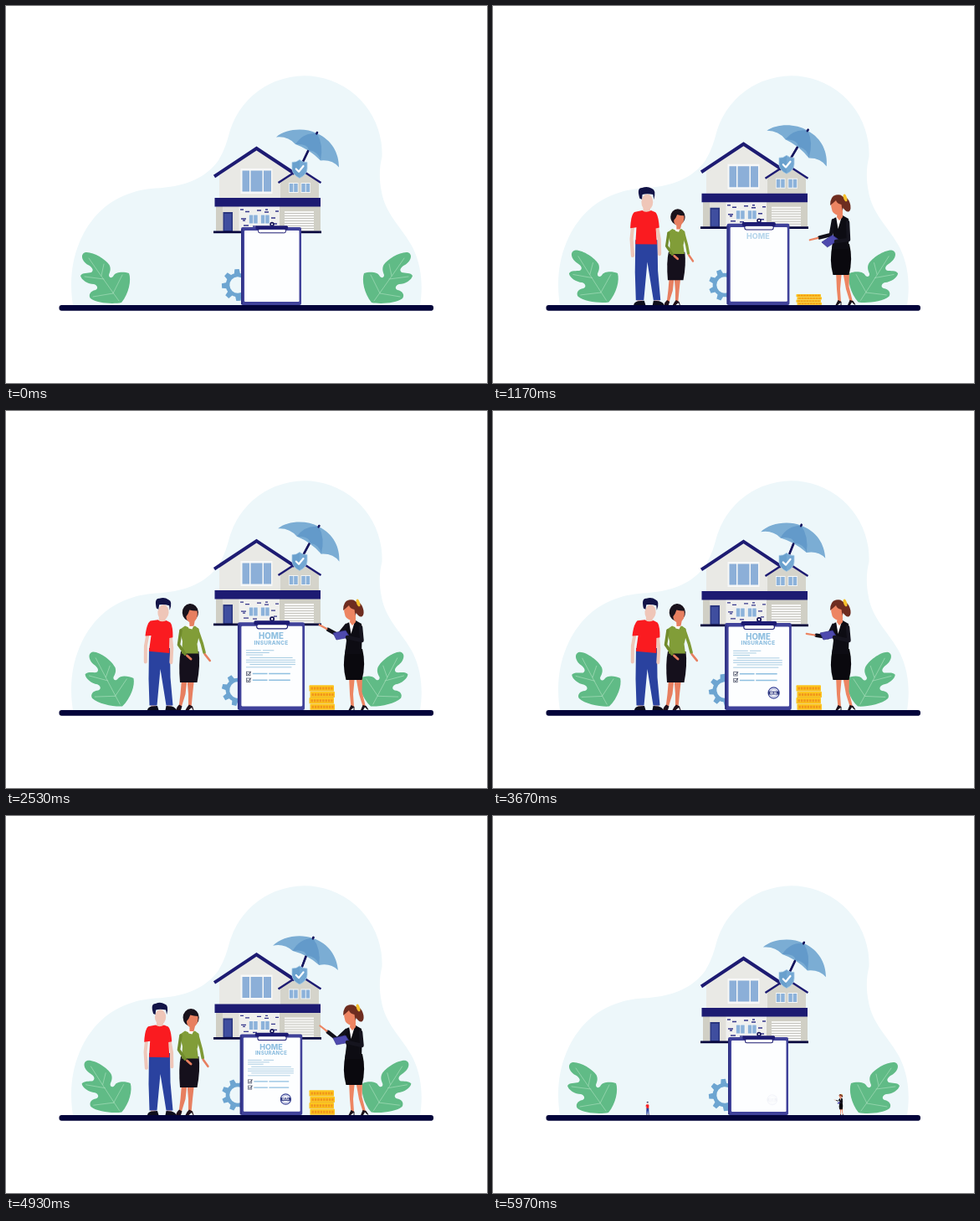
Recreate the animation shown at these times as an HTML page. Size 575 px wide and 450 px high, loop 6.01 s.

```html
<!DOCTYPE html>
<html lang="en">
<head>
<meta charset="utf-8">
<title>Home insurance</title>
<style>
html, body { margin: 0; width: 100%; height: 100%; overflow: hidden; background: #fff; }
svg { display: block; width: 575px; height: 450px; }
text { font-family: Inter, Lato, sans-serif; font-weight: 800; text-anchor: middle; fill: #8fbfe0; }
.line { fill: none; stroke-linecap: round; stroke-linejoin: round; }
</style>
</head>
<body>
<svg viewBox="0 0 575 450">
  <defs>
    <g id="leaf">
      <path fill="#60bb86" d="M95 294C104 293 119 302 123.500 309C126 314 124 318 123 321C123 325 127 325 128.500 322C131 317 141 317 147 319C150 327 147 343 138 354C128 356 109 355 101 349C98 345 101 340 107 339C111 337 109 333 105 332C98 332 90 327 89 322C91 318 98 319 102 318C106 315 102 311 98 309C91 305 88 296 95 294Z"/>
      <path class="line" stroke="#a5dcb9" stroke-width=".7" d="M99 301Q112 320 135 352M94 323L117 326M104 347L128 343M139 321L128 343M117 308L114 322"/>
    </g>
    <g id="pane"><path fill="#f5f7f7" d="M0 0h11.500v12h-11.500z"/><path fill="#8cb2da" d="M.8 1h4.500v10h-4.500zM6.200 1h4.500v10h-4.500z"/></g>
  </defs>

  <path fill="#edf7fa" d="M80 357C76 332 77 301 93 271C111 238 141 220 179 217.500C211 216 236 207 252 187C261 174 264 162 268 148A93 93 0 0 1 449.500 180C446 194 446 207 449 222C454 250 475 266 487 290C496 309 499 332 495 357Z"/>

  <g id="leafL"><use href="#leaf"/></g>
  <g transform="matrix(-1 0 0 1 575 0)"><g id="leafR"><use href="#leaf"/></g></g>

  <g id="gear"></g>

  <g id="house">
    <path fill="#e9e9e5" d="M255 201L299.500 171L345 201V230H255Z"/>
    <path fill="#d5d4cb" d="M328 209L351 194L374 209V230H328Z"/>
    <path class="line" style="stroke-linecap:butt;stroke-linejoin:miter" stroke="#1d1b72" stroke-width="4" d="M249 203.500L299.500 170L345 200"/>
    <path class="line" style="stroke-linecap:butt" stroke="#1d1b72" stroke-width="2.400" d="M325.500 211L351 194.500L376.500 211"/>
    <path fill="#f7f8f8" d="M280.500 194h38v30h-38z"/>
    <path fill="#8cafd8" d="M282.500 196.500h8.500v25h-8.500zM292.500 196.500h14v25h-14zM308 196.500h9v25h-9z"/>
    <use href="#pane" x="338" y="211"/><use href="#pane" x="352.500" y="211"/>
    <path fill="#e1e0da" d="M251 239h125v30h-125z"/>
    <path fill="#d0cfc5" d="M251 239h8v30h-8zM327 239h49v30h-49z"/>
    <path fill="#f0f0ee" d="M278.500 239h48.500v30h-48.500z"/>
    <path fill="#1d1b72" d="M249.500 229h126.500v10.500h-126.500z"/>
    <path fill="#29357f" d="M259.500 246h11.500v23h-11.500z"/>
    <path fill="#3f4e9f" d="M261 248h8.500v20h-8.500z"/>
    <path fill="#f7f7f5" d="M333 245h35v23h-35z"/>
    <path stroke="#bebdb7" stroke-width=".9" d="M333 247.500h35M333 250.500h35M333 253.500h35M333 256.500h35M333 259.500h35M333 262.500h35M333 265.500h35"/>
    <path stroke="#37388c" stroke-width="1.300" d="M280 243h4M286 245.500h5M300 244h5M310 243h3M322 245h4M281 254h6M283 256h3M284 262h6M317 253h5M320 260h4M309 246h5M295 263h5"/>
    <use href="#pane" x="290" y="248.500"/><use href="#pane" x="304" y="248.500"/>
    <path fill="#08083f" d="M248 268.500h129v2.800h-129z"/>
    <g id="umbrella">
      <path class="line" stroke="#17165e" stroke-width="2.400" d="M372 151L353 190"/>
      <path fill="#7badd4" d="M323 156.500C334 147 356 144.500 371.500 152C390 160 398 176 398 192.500Q390 183 376 184.500Q363 171 346 165Q337 155 323 156.500Z"/>
      <path fill="#639aca" d="M371.500 152Q355 151 346 165Q361 164 362 172Q374 174 376 184.500Q380 165 371.500 152Z"/>
      <path class="line" stroke="#17165e" stroke-width="2.400" d="M361 173L353 190M372 151L371.300 152.500"/>
    </g>
    <path fill="#74a8d3" stroke="#a4c9e5" stroke-width=".8" d="M351 183.500Q355 187 360 186.500V194Q360 201 351 205.500Q342 201 342 194V186.500Q347 187 351 183.500Z"/>
    <path fill="#5e97c8" opacity=".5" d="M351 184V205Q342.500 201 342.500 194V187Q347 187 351 184Z"/>
    <path class="line" stroke="#fff" stroke-width="2.200" d="M346.800 194.500L350 197.700L355.500 191"/>
  </g>

  <g id="board">
    <rect x="281" y="264" width="72" height="93" rx="2" fill="#40429a"/>
    <path fill="#2e3084" d="M281 266h2v90h-2z"/>
    <rect x="285" y="268" width="65.500" height="85" rx="1" fill="#fdfeff"/>
    <rect x="301.500" y="266" width="33" height="4.800" rx="2" fill="#fff" stroke="#1d1b72" stroke-width="1"/>
    <circle cx="318" cy="260.500" r="1.900" fill="#fff" stroke="#151457" stroke-width="1.600"/>
    <rect x="298.500" y="262.300" width="38.500" height="4.400" rx="1.500" fill="#1d1b72"/>
    <text id="home" x="317" y="281.800" font-size="8.700">HOME</text>
    <text id="insure" x="317" y="287.500" font-size="5.800" letter-spacing=".25">INSURANCE</text>
    <path id="lines" stroke="#9dc6df" stroke-width=".8" d="M290 293.800h16M308 293.800h12M290 296.200h25M290 298.500h18M294 301.500h46M290 304h53M290 306.300h53M294 308.700h49M290 311.600h49"/>
    <g id="checks"></g>
    <g id="stamp">
      <circle cx="333.800" cy="338.700" r="5.900" fill="#fff" stroke="#3b4597" stroke-width="1.100"/>
      <circle cx="333.800" cy="338.700" r="4.200" fill="none" stroke="#7d87c2" stroke-width=".7"/>
      <path fill="#2d367f" d="M327.900 336.900h11.800v3.600h-11.800z"/>
      <text x="333.800" y="339.900" font-size="3.200" style="fill:#fff">SEAL</text>
    </g>
  </g>

  <g id="coins"></g>

  <g id="man">
    <path fill="#efc6b8" d="M173 349h6v5h-6zM192.500 349h5.500v5h-5.500z"/>
    <path fill="#0d0d1b" d="M169 357Q169.500 353.500 174 352.500L181 352L182.500 357ZM190.500 357L191.500 352L198 352.500Q203 354 203.500 357Z"/>
    <path fill="#2a429f" d="M171 283H196L196.500 318L199.500 351.500H191.500L184.500 308L180.500 351.500H171.500L170.500 320Z"/>
    <g id="manTop">
      <path class="line" stroke="#efc6b8" stroke-width="4" d="M168 266L166.500 282L168 301M195 266L198 282L198.500 299"/>
      <path fill="#efc6b8" d="M179.500 244h8v8h-8z"/>
      <path fill="#fa1b20" d="M178.500 249.500Q183 253 188.500 249.500L193.500 251.500Q197 255 198 269L194 270L195.500 288H171L172 269L165 270Q165.500 255 169.500 251.500Z"/>
      <ellipse cx="184" cy="240" rx="6.600" ry="9" fill="#efc6b8"/>
      <path fill="#121347" d="M175.500 236Q171.500 224 178 224Q184 221.500 189 224.500Q194.500 226 191.500 237L190.500 231.500Q184 230 178.500 231.500L178 237Z"/>
    </g>
  </g>

  <g id="wife">
    <path fill="#e77f60" d="M210 320H216.500L214.500 338L209.500 354H206.500L208.500 338ZM216.500 320H225L223 338L221.500 354H218L218 338Z"/>
    <path fill="#201019" d="M203 357Q204 353 207 350.500L210.500 352.500L209 357H207.500ZM214.500 357Q217 352 219 350.500L223 352.500L224.500 357H223.500L222 354L218.500 357Z"/>
    <path fill="#15101c" d="M209 287H230.500Q232.500 303 228.500 324H208Q206 300 209 287Z"/>
    <g id="wifeArm">
      <path class="line" stroke="#7f9a35" stroke-width="3.600" d="M228.500 261L233 278L235 289"/>
      <path class="line" stroke="#e77f60" stroke-width="2.600" d="M235.500 291L241 299"/>
    </g>
    <path fill="#819d38" d="M214 256.500Q220 260 226 256.500L230.500 260Q231 270 228.500 278L230 289.500H210L211 275L207.500 261Z"/>
    <path class="line" stroke="#718b2c" stroke-width="3.600" d="M209 262L206.500 279L214 290"/>
    <path class="line" stroke="#e77f60" stroke-width="3" d="M216.500 292L221 296"/>
    <path fill="#fff" d="M216 254.500h9l-2.500 6l-4-1z"/>
    <g id="wifeHead">
      <ellipse cx="221.300" cy="240.500" rx="9.600" ry="10.500" fill="#19121c"/>
      <path fill="#e77f60" d="M216 245Q219 242 220.500 237.500Q225 239 229.500 239Q230.500 247 226 251L224.500 257H219.500V252Q216 250 216 245Z"/>
    </g>
  </g>

  <g id="agent">
    <path fill="#ed8562" d="M410 316H417L415 338L416 354H412.500L411 338ZM418 316H426L425.500 335L430 353L427 354L422 338Z"/>
    <path fill="#1a1019" d="M409.500 357L412.500 351L416.500 353V357H415.500V354L412 357ZM424 357L426.500 351L430.500 352L433.500 356.500H432L429 353.500L427 357Z"/>
    <path fill="#0a090e" d="M406 284H426Q430.500 302 425.500 321H406.500Q401.500 303 406 284Z"/>
    <path fill="#0d0c13" d="M408 253L418 250L425 254L425.500 272L425 290H405L407 274L404 262Z"/>
    <path fill="#fff" d="M410 251L417 251L412.500 266Z"/>
    <path id="sleeve" class="line" stroke="#111019" stroke-width="4.600"/>
    <path id="hand" class="line" stroke="#ed8562" stroke-width="2.200"/>
    <g id="tablet"><path fill="#4e4aae" stroke="#35338b" stroke-width=".7" d="M391 265L406 262L411 270L395 273Z"/></g>
    <path id="hold" class="line" stroke="#15141e" stroke-width="4.500"/>
    <path fill="#ed8562" d="M412 243h6v9l-4 4l-3-4z"/>
    <ellipse cx="422" cy="236.500" rx="4.800" ry="9.500" transform="rotate(-20 422 236.500)" fill="#6e2d20"/>
    <path fill="#ed8562" d="M404 235Q410 226 418 232L417 244Q414 250 410 249Q404 247 404 235Z"/>
    <path fill="#6e2d20" d="M403 238Q403 227 410 225.500Q418 224 420 231Q420 240 417.500 244L416.500 237Q411 236 410 232Q407 235 403 238Z"/>
    <ellipse cx="421" cy="229" rx="2" ry="4.600" transform="rotate(-18 421 229)" fill="#f5c02c"/>
  </g>

  <rect x="63.500" y="357" width="447.500" height="6.800" rx="3" fill="#03043a"/>
</svg>
<script>
const LOOP = 6010;
const $ = id => document.getElementById(id);
const clamp = u => Math.max(0, Math.min(1, u));
const span = (t, start, dur) => clamp((t - start) / dur);
const move = (id, value) => $(id).setAttribute('transform', value);
const path = (id, d) => $(id).setAttribute('d', d);
const backOut = u => 1 + 2.2 * (u - 1) ** 3 + 1.2 * (u - 1) ** 2;
const mix = (a, b, u) => a + (b - a) * u;

// Smoothed interpolation through [time, value] stops
function keyed(stops, t) {
  for (let i = 1; i < stops.length; i++) {
    const [t0, a] = stops[i - 1], [t1, b] = stops[i];
    if (t <= t1) {
      const u = span(t, t0, t1 - t0);
      return mix(a, b, u * u * (3 - 2 * u));
    }
  }
  return stops[stops.length - 1][1];
}

const grow = (t, inAt, inDur, outAt, outDur) =>
  t < inAt ? 0 : backOut(span(t, inAt, inDur)) * (1 - span(t, outAt, outDur) ** 3);

function scaleAt(id, x, y, sx, sy = sx) {
  $(id).style.display = sx > .005 && sy > .005 ? '' : 'none';
  move(id, `translate(${x} ${y}) scale(${sx} ${sy}) translate(${-x} ${-y})`);
}

function fade(id, t, start, dur, out = 5550) {
  $(id).setAttribute('opacity', span(t, start, dur) * (1 - span(t, out, 400)));
}

let cog = '<circle r="12" fill="none" stroke="#6da5d1" stroke-width="4.600"/>';
for (let a = 0; a < 360; a += 45)
  cog += `<path fill="#6da5d1" transform="rotate(${a})" d="M-3.600 -13L-2.700 -19H2.700L3.600 -13Z"/>`;
$('gear').innerHTML = cog;

let stack = '';
for (let i = 0; i < 4; i++) {
  const x = 362.5 + (i % 2), y = 327.3 + i * 7.4;
  stack += `<rect x="${x}" y="${y}" width="29.500" height="7" rx="1" fill="#fcc51f"/>
    <path stroke="#f1951b" stroke-width="3" stroke-dasharray="2.400 1" d="M${x + 2} ${y + 3.7}h26"/>
    <path stroke="#e9a918" stroke-width=".6" d="M${x} ${y + 6.8}h29.500"/>`;
}
$('coins').innerHTML = stack;

$('checks').innerHTML = [318.4, 325.3].map(y =>
  `<rect x="290.500" y="${y - 2}" width="4" height="4" fill="#fff" stroke="#555b70" stroke-width=".7"/>
   <path class="line" stroke="#30364f" stroke-width=".8" d="M291.300 ${y}l1.200 1.200l2.500 -3.200"/>
   <path stroke="#8fbfe0" stroke-width="1.200" d="M297 ${y}h16M314.500 ${y}h23"/>`).join('');

const LIFT = [[0, .6], [1170, 0], [1930, .4], [2530, .82], [3670, .45], [4930, 1], [6010, .6]];

function draw(t) {
  const phase = 2 * Math.PI * t / LOOP;
  const k = (1 - Math.cos(phase)) / 2;
  const lean = ((1 - Math.cos(phase - .12)) / 2) ** 2;

  for (const id of ['leafL', 'leafR'])
    move(id, `translate(${k} ${-3 * k}) rotate(${8 * k} 128 355)`);
  move('gear', `translate(277 333) rotate(${42 + 360 * t / LOOP})`);
  move('house', `translate(0 ${-15.9 * k})`);
  move('umbrella', `rotate(${5.5 * Math.sin(phase)} 352 203)`);
  scaleAt('board', 317, 357, 1 + .12 * k, 1 + .135 * k);

  fade('home', t, 950, 350);
  fade('insure', t, 1250, 350);
  fade('lines', t, 1650, 500);
  fade('checks', t, 2050, 400);
  fade('stamp', t, 2700, 350, 5590);

  scaleAt('man', 185, 357, grow(t, 600, 850, 5300, 700));
  scaleAt('agent', 416, 357, grow(t, 300, 800, 5300, 720));
  scaleAt('wife', 218, 357, grow(t, 890, 800, 5100, 700));
  const pile = (1 - (1 - span(t, 1030, 800)) ** 3) * (1 - span(t, 5000, 700) ** 3);
  scaleAt('coins', 377, 357, 1, pile);

  move('manTop', `rotate(${6 * lean} 184 286)`);
  move('wifeArm', `rotate(${-5 * lean} 228 260)`);
  move('wifeHead', `rotate(${-4 * lean} 221 257)`);

  const lift = keyed(LIFT, t);
  const angle = mix(-14, 38, lift) * Math.PI / 180;
  const ex = mix(404, 396, lift), ey = mix(273, 266.5, lift);
  const along = d => `${ex - d * Math.cos(angle)} ${ey - d * Math.sin(angle)}`;
  path('sleeve', `M407 256L${ex} ${ey}L${along(14)}`);
  path('hand', `M${along(16)}L${along(26)}`);

  const raise = keyed([[0, 0], [1170, 0], [2530, 1], [5300, 1], [6010, 0]], t);
  const low = 1 - raise;
  move('tablet', `translate(${low * 2} ${low * 13}) rotate(${-22 * low} 401 267)`);
  path('hold', `M424 258L${mix(425, 425.5, raise)} ${mix(279, 274, raise)}L${mix(410, 408, raise)} ${mix(281, 270, raise)}`);
}

const begin = performance.now();
function tick() {
  draw((performance.now() - begin) % LOOP);
  requestAnimationFrame(tick);
}
tick();
</script>
</body>
</html>
```
